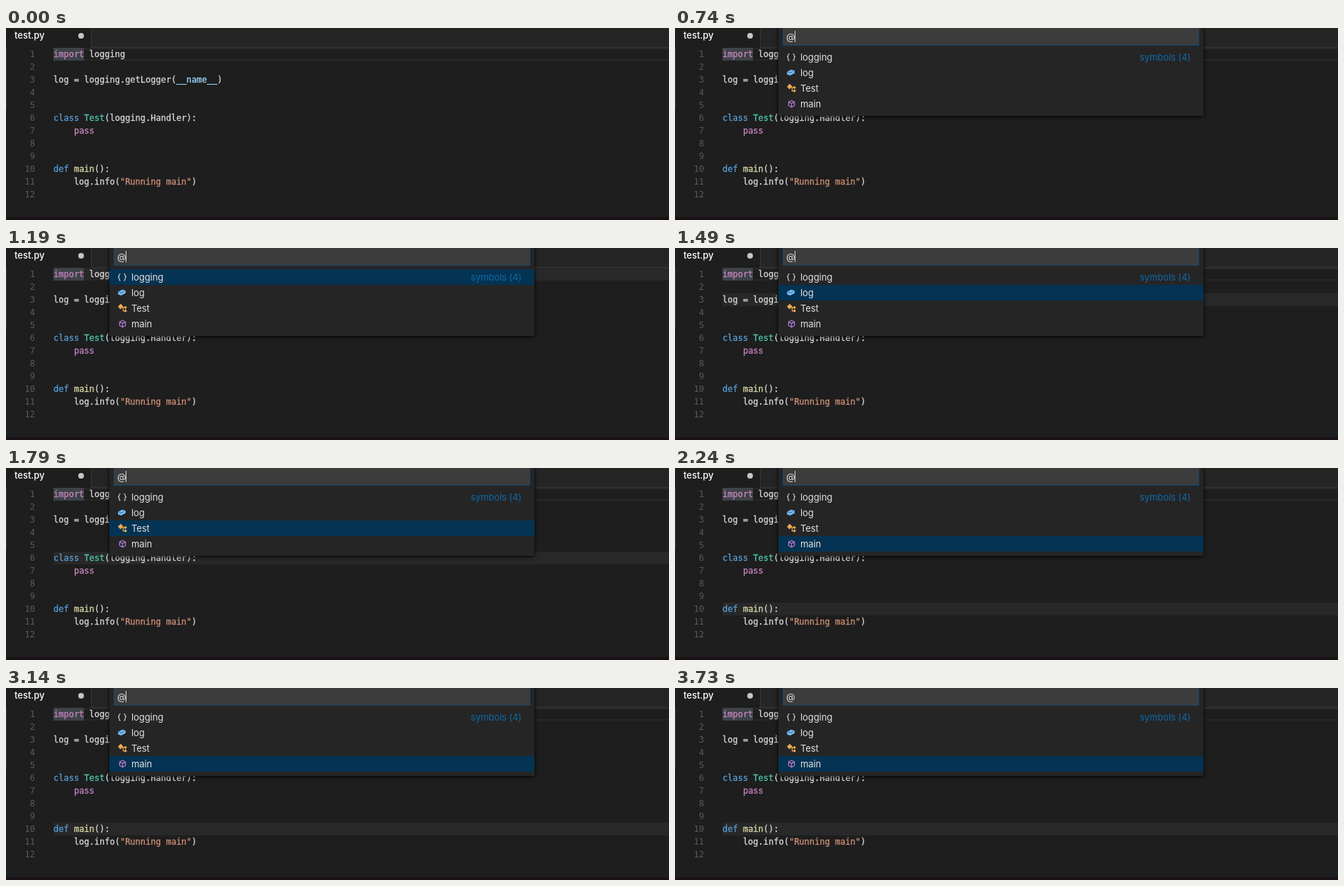
Write an HTML page that moves like this. It is 936x271 px and loops after 3.83 s.

```html
<!DOCTYPE html>
<html lang="en">
<head>
<meta charset="utf-8">
<title>Go to symbol</title>
<style>
  html, body { margin: 0; width: 100%; height: 100%; overflow: hidden; background: #1e1e1e; }
  #stage { position: relative; width: 936px; height: 271px; overflow: hidden; background: #1e1e1e; }
  #stage div, #stage pre, #stage svg { position: absolute; margin: 0; box-sizing: border-box; }

  .ui { font: 13px/22px Inter, "Open Sans", sans-serif; letter-spacing: -.08px; color: #e2e2e2; white-space: pre; }
  .tabs { left: 120px; top: 0; right: 0; height: 28px; background: #252526; border: solid #363636; border-width: 0 0 1px 1px; }
  .tab { left: 12px; top: -1px; color: #fff; font-weight: 500; letter-spacing: 0; }
  .dirty { left: 102px; top: 7px; width: 8px; height: 8px; border-radius: 50%; background: #c5c5c5; }
  .edge { left: 0; top: 28px; width: 1px; height: 87px; background: #383838; }
  .floor { left: 0; right: 0; top: 267px; height: 4px; background: #1a1216; }

  .current { left: 67px; right: 0; top: 28px; height: 18px; border: solid #282828; border-width: 2px 0; }
  .word { left: 67px; top: 28px; width: 43px; height: 18px; background: #3e4348; }
  .range { left: 67px; right: 0; height: 18px; background: #282828; opacity: 0; }
  pre { top: 28px; font: 12px/18px "DejaVu Sans Mono", monospace; color: #d8d8d8; -webkit-text-stroke: .3px; }
  .numbers { left: 0; width: 41px; text-align: right; color: #5a5a5a; -webkit-text-stroke: 0; }
  .code { left: 67px; }
  .ctl { color: #c586c0; } .key { color: #569cd6; } .type { color: #4ec9b0; }
  .fn { color: #dcdcaa; } .var { color: #9cdcfe; } .str { color: #ce9178; }

  #palette { left: 146px; top: -20px; width: 600px; height: 144px; background: #252526; box-shadow: 0 1px 5px #000; opacity: 0; }
  .input { left: 6px; top: 0; width: 588px; height: 45px; background: #3c3c3c; border: 1px solid #164668; }
  .at { left: 11px; top: 21px; }
  #caret { left: 23px; top: 24px; width: 1px; height: 16px; background: #d8d8d8; }
  #ranges, #rows { left: 0; top: 0; width: 100%; height: 100%; }
  .row { left: 0; width: 600px; height: 22px; }
  .pick { inset: 0; background: #043353; opacity: 0; }
  .row svg { left: 11px; top: 3px; width: 16px; height: 16px; }
  .label { left: 31px; top: 0; }
  .count { right: 18px; top: 50px; color: #0f69a6; }
</style>
</head>
<body>
<div id="stage">
  <div class="tabs"></div>
  <div class="ui tab">test.py</div>
  <div class="dirty"></div>
  <div class="edge"></div>
  <div id="ranges"></div>
  <div class="current"></div>
  <div class="word"></div>
  <pre class="numbers"></pre>
  <pre class="code"><span class="ctl">import</span> logging

log = logging.getLogger(<span class="var">__name__</span>)


<span class="key">class</span> <span class="type">Test</span>(logging.Handler):
    <span class="ctl">pass</span>


<span class="key">def</span> <span class="fn">main</span>():
    log.info(<span class="str">"Running main"</span>)
</pre>
  <div class="floor"></div>
  <div id="palette" class="ui">
    <div class="input"></div>
    <div class="at">@</div>
    <div id="caret"></div>
    <div id="rows"></div>
    <div class="count">symbols (4)</div>
  </div>
</div>
<script>
const LOOP = 3830;
const $ = selector => document.querySelector(selector);

const symbols = [
  { name: 'logging', line: 1, from: 1190, to: 1490, icon:
    `<path d="M4.6 3.5Q2.8 3.3 2.9 5.2T1.2 8Q3 8 2.9 10.8T4.6 12.5M9.4 3.5Q11.2 3.3 11.1 5.2T12.8 8Q11 8 11.1 10.8T9.4 12.5"
      fill="none" stroke="#d0d0d0" stroke-width="1.2"/>` },
  { name: 'log', line: 3, from: 1490, to: 1790, icon:
    `<path d="M1.2 6.8 7.2 3.8 11.8 5.3V8.8L5.6 12 1.2 10.4Z" fill="#75beff"/>
     <path d="M2.4 7.2 5.6 8.4 9.6 6.4" fill="none" stroke="#2f4f6b" stroke-width=".9"/>` },
  { name: 'Test', line: 6, from: 1790, to: 2240, icon:
    `<path d="M5 1.8 8.6 5.4 4.6 9.4 1 5.8Z" fill="#e8ab53"/>
     <path d="M6.5 6.8H10M8.4 7V12H10" fill="none" stroke="#e8ab53" stroke-width="1.2"/>
     <path d="M11.6 4.7 13.9 7 11.6 9.2 9.4 7ZM11.6 9.6 13.9 11.8 11.6 14 9.4 11.8Z" fill="#e8ab53"/>` },
  { name: 'main', line: 10, from: 2240, to: LOOP, icon:
    `<path id="cube" d="M7.5 3.3 11.6 5.4V10.4L7.5 12.7 3.4 10.4V5.4ZM3.4 5.4 7.5 7.6 11.6 5.4M7.5 7.6V12.7"
      fill="none" stroke="#b180d7" stroke-width="1.2"/>` }
];

$('.numbers').textContent = Array.from({ length: 12 }, (_, i) => i + 1).join('\n');
$('#ranges').innerHTML = symbols.map(s =>
  `<div class="range" style="top:${10 + 18 * s.line}px"></div>`).join('');
$('#rows').innerHTML = symbols.map((s, i) =>
  `<div class="row" style="top:${50 + 22 * i}px"><div class="pick"></div>
   <svg viewBox="0 0 16 16">${s.icon}</svg><div class="label">${s.name}</div></div>`).join('');

// Hold each value until the next [time, value] step.
function step(el, prop, steps) {
  const frames = steps.map(([t, value]) => ({ offset: t / LOOP, [prop]: value, easing: 'step-end' }));
  frames.push({ offset: 1, [prop]: steps.at(-1)[1] });
  const motion = el.animate(frames, { duration: LOOP, iterations: Infinity });
  motion.startTime = 0;
}

function showBetween(el, from, to) {
  const steps = [[0, 0], [from, 1]];
  if (to < LOOP) steps.push([to, 0]);
  step(el, 'opacity', steps);
}

showBetween($('#palette'), 740, LOOP);
step($('#caret'), 'opacity', [[0, 1], [2690, 0], [3140, 1], [3730, 0]]);
step($('#cube'), 'stroke', [[0, '#b180d7'], [2240, '#c878d0']]);

const ranges = document.querySelectorAll('.range');
const picks = document.querySelectorAll('.pick');
symbols.forEach((s, i) => {
  showBetween(ranges[i], s.from, s.to);
  showBetween(picks[i], s.from, s.to);
});
</script>
</body>
</html>
```
